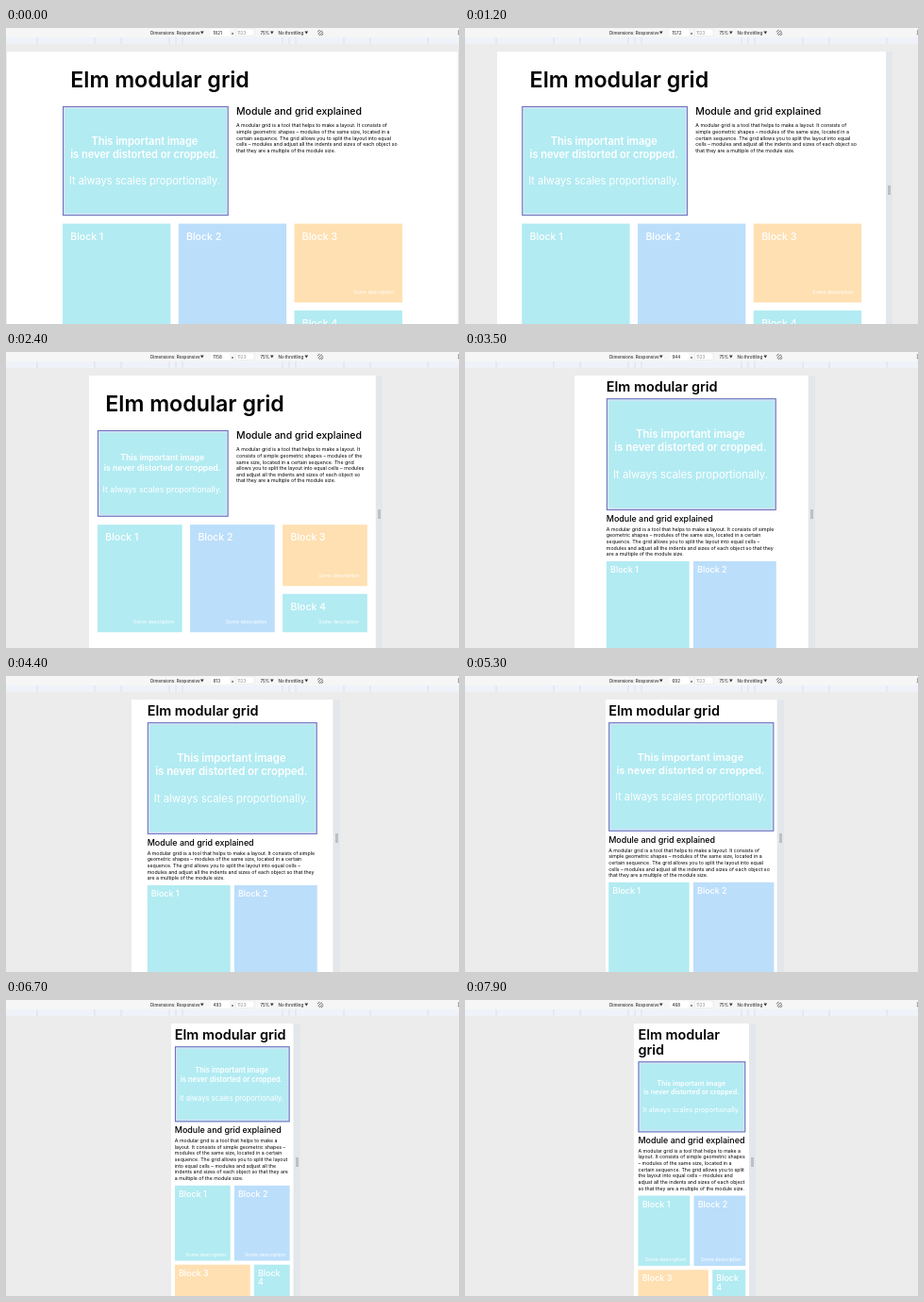
Recreate the animation shown at these times as an HTML page. Size 480x314 px, loop 8 s.

```html
<!DOCTYPE html>
<html lang="en">
<head>
<meta charset="utf-8">
<title>Elm modular grid</title>
<style>
  * { box-sizing: border-box; margin: 0; }
  html, body { width: 100%; height: 100%; overflow: hidden; }
  body { position: relative; background: #ececed; font-family: Inter, sans-serif; color: #000; }
  #bar { position: absolute; left: 0; top: 0; }
  #handle { position: absolute; top: 25px; width: 7px; height: 289px; background: #e3e7eb; }
  #handle::after { content: ""; position: absolute; left: 2px; top: 142px; width: 3px; height: 10px; background: #bcc0c5; }

  #page {
    --g: 32px; --head: 40px;
    position: absolute; top: 25px; height: 1102px; overflow: hidden; background: #fff;
    transform: scale(.2623); transform-origin: 0 0;
    font-size: 20px; line-height: 25.3px;
  }
  main { margin: 0 auto; }
  h1 { padding-left: 32px; font-size: 88.5px; font-weight: 600; line-height: 221px; }
  h2 { font-size: var(--head); line-height: var(--head); font-weight: 500; }
  article p { margin-top: 26px; }
  .grid {
    display: grid; gap: var(--g);
    grid-template-columns: repeat(12, minmax(0, 1fr));
    grid-template-rows: auto calc(3 * var(--m) + 2 * var(--g)) calc(2 * var(--m) + var(--g));
  }
  figure, article { grid-column: span 6; }
  figure {
    width: 100%; aspect-ratio: 1.512; align-self: start; container-type: inline-size;
    display: flex; align-items: center; justify-content: center; text-align: center;
    border: 4px solid #716fbd; background: #b2ebf2; box-shadow: inset 0 0 0 6px #d3e4f5; color: #fff;
  }
  figure p { font-size: 6.35cqw; line-height: 8.15cqw; white-space: nowrap; margin-right: 1cqw; }
  figure b { font-weight: 600; }
  section { position: relative; grid-column: span 4; padding: var(--g); color: #fff; }
  section p { position: absolute; right: var(--g); bottom: var(--g); line-height: 20px; white-space: nowrap; }
  .tall { grid-row: span 2; }
  .cyan { background: #b2ebf2; }
  .blue { background: #bbdefb; }
  .orange { background: #ffe0b2; }

  #page.small { --g: 16px; --head: 34px; }
  .small h1 { padding: 14.5px 0 16px; font-size: 55px; line-height: 61px; }
  .small h2 { line-height: 36px; }
  .small article p { margin-top: 11.5px; }
  .small .grid {
    grid-template-columns: repeat(6, minmax(0, 1fr));
    grid-template-rows: auto auto repeat(2, calc(4 * var(--m) + 3 * var(--g)));
  }
  .small .tall { grid-column: span 3; grid-row: auto; }
  .small .narrow { grid-column: span 2; }
</style>
</head>
<body>
<svg id="bar" width="480" height="25" font-size="4.5" font-weight="500" fill="#333">
  <rect width="480" height="10" fill="#f6f6f7"/>
  <rect y="10" width="480" height="7" fill="#eff3f9"/>
  <path id="ticks" stroke="#d9e0ea"/>
  <rect x="217" y="1" width="20" height="7.5" fill="#fff"/>
  <rect x="243.5" y="1" width="19.5" height="7.5" fill="#fff" stroke="#e2e2e2" stroke-width=".5"/>
  <text x="153" y="6.5">Dimensions: Responsive</text>
  <text id="size" x="219.5" y="6.5"></text>
  <text x="238.5" y="6.5">×</text>
  <text x="245" y="6.5" fill="#999">1123</text>
  <text x="269.5" y="6.5">75%</text>
  <text x="288.5" y="6.5">No throttling</text>
  <path d="M206 3.6h3.6l-1.8 2.8zM280 3.6h3.6l-1.8 2.8zM316.5 3.6h3.6l-1.8 2.8z"/>
  <path d="M331 6.2l3.2-3.4 1.4 1.4-3.2 3.4zM330.4 4.4q.3-2 2.2-2.2M336 5.6q-.3 2-2.2 2.2" fill="none" stroke="#444" stroke-width=".7"/>
  <path d="M479.4 2.5v1m0 .8v1m0 .8v1" stroke="#555"/>
</svg>
<div id="page">
  <main>
    <h1>Elm modular grid</h1>
    <div class="grid">
      <figure><p><b>This important image<br>is never distorted or cropped.</b><br><br>It always scales proportionally.</p></figure>
      <article>
        <h2>Module and grid explained</h2>
        <p>A modular grid is a tool that helps to make a layout. It consists of simple geometric shapes – modules of the same size, located in a certain sequence. The grid allows you to split the layout into equal cells – modules and adjust all the indents and sizes of each object so that they are a multiple of the module size.</p>
      </article>
      <section class="cyan tall"><h2>Block 1</h2><p>Some description</p></section>
      <section class="blue tall"><h2>Block 2</h2><p>Some description</p></section>
      <section class="orange"><h2>Block 3</h2><p>Some description</p></section>
      <section class="cyan narrow"><h2>Block 4</h2><p>Some description</p></section>
    </div>
  </main>
</div>
<div id="handle"></div>
<script>
  const SCALE = 0.2623, LOOP = 8000, STEP = 100;
  // [time in ms, viewport width in CSS px]
  const drag = [
    [0, 1821], [900, 1675], [1200, 1572], [1800, 1330], [2400, 1158], [2700, 1120],
    [2900, 1120], [3500, 944], [3800, 888], [4700, 775], [5000, 750], [5100, 750],
    [5300, 692], [6000, 570], [6700, 493], [7700, 493], [7900, 468], [8000, 468]
  ];
  const $ = id => document.getElementById(id);
  const page = $('page'), main = document.querySelector('main');

  $('ticks').setAttribute('d', [53, 60, 67, 118, 146, 207]
    .map(x => `M${240 - x} 10v7M${240 + x} 10v7`).join(''));

  function widthAt(t) {
    const i = drag.findIndex(([time]) => time > t);
    const [t0, w0] = drag[i - 1], [t1, w1] = drag[i];
    return Math.round(w0 + (w1 - w0) * (t - t0) / (t1 - t0));
  }

  function layout(width) {
    const small = width < 1024;
    const module = small
      ? Math.min(101, Math.floor(0.172 * width - 20.5))
      : Math.min(85, (width - 420) / 12);
    const half = width * SCALE / 2;
    page.classList.toggle('small', small);
    page.style.setProperty('--m', module + 'px');
    page.style.width = width + 'px';
    page.style.left = 240 - half + 'px';
    main.style.width = (small ? 6 * module + 80 : 12 * module + 352) + 'px';
    $('handle').style.left = 240 + half + 'px';
    $('size').textContent = width;
  }

  function frame(now) {
    layout(widthAt(Math.floor(now % LOOP / STEP) * STEP));
    requestAnimationFrame(frame);
  }
  frame(performance.now());
</script>
</body>
</html>
```
